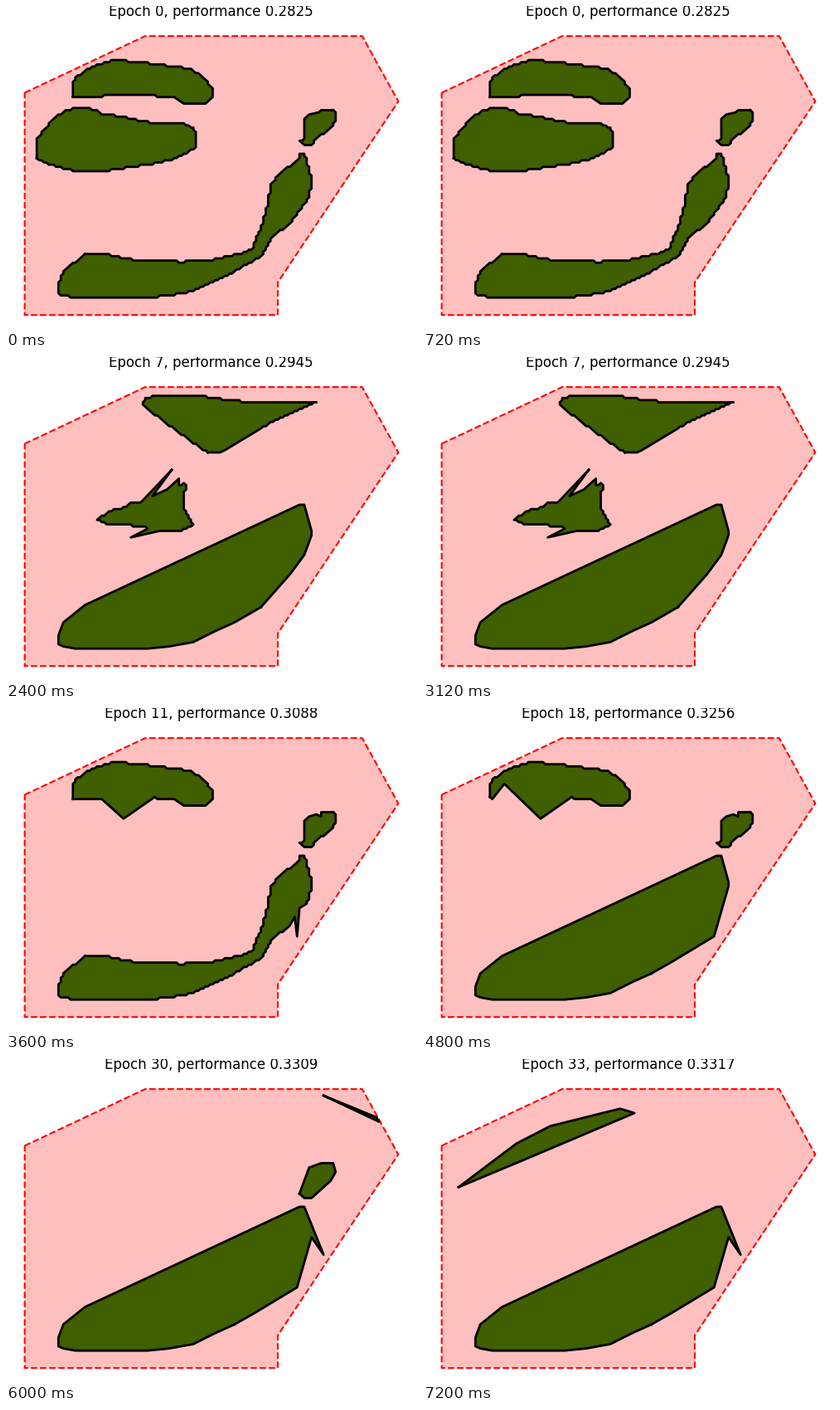
A matplotlib script for the animation above (8000 ms loop, 496 by 389 pixels).

```python
import matplotlib.pyplot as plt
import numpy as np
from matplotlib.animation import FuncAnimation

WIDTH, HEIGHT = 496, 389
COLS, ROWS = 155, 128  # the region's extent in grid cells
MARGIN = 0.05
AXES_HEIGHT = 369.6
INTERVAL = 400
FRAMES = 20
HOLD = 3  # animation frames per scene


def stairs(*keys):
    """Walk from key to key along grid cells, one cell at a time."""
    path = [keys[0]]
    for a, b in zip(keys, keys[1:]):
        count = max(abs(b[0] - a[0]), abs(b[1] - a[1]))
        walk = np.linspace(a, b, count + 1)[1:]
        path += [tuple(p) for p in np.floor(walk + 0.5)]
    return path


# Every point below is a (column, row) grid cell.
region = [(0, 26), (50, 0), (140, 0), (155, 30), (105, 113), (105, 128),
          (0, 128)]

# Upper-left cap: shared crest, varying underside
crest = stairs((20, 28), (20, 22), (21, 19), (28, 14), (37, 11), (42, 11),
               (43, 12), (48, 12), (69, 15), (73, 18), (78, 24), (78, 28))
base = stairs((62, 28), (56, 28), (54, 27), (33, 27), (32, 28))
ledge = [(75, 31), (66, 31)]
notch = ledge + [(62, 28), (55, 28), (54, 27), (41, 37)]
cap_full = crest + ledge + base
cap_cut = crest + [(73, 25), (66, 31)] + base
cap_wedge = crest + notch + [(32, 28)]
cap_bitten = crest[1:] + notch + [(26, 21), (21, 28)]

lens = stairs((5, 56), (5, 47), (12, 38), (17, 34), (21, 33), (26, 33),
              (30, 34), (32, 36), (35, 36), (54, 40), (65, 40), (70, 42),
              (71, 45), (71, 51), (63, 56), (51, 59), (32, 62), (21, 62),
              (14, 60), (8, 58), (5, 56))

# Small blob on the right
blob_side = stairs((128, 34), (129, 36), (129, 38), (127, 42), (120, 48),
                   (119, 50), (116, 50), (114, 48), (116, 47), (116, 38),
                   (118, 36))
blob = blob_side + stairs((122, 35), (123, 34))
blob_nicked = blob_side + [(121, 35), (123, 36), (123, 34)]
blob_hull = [(114, 48), (118, 36), (123, 34), (128, 34), (129, 38),
             (127, 42), (119, 50), (116, 50)]

# Curved arm and the hulls sharing its lower edge
bottom = [(98, 101), (87, 108), (79, 112), (70, 117), (60, 119), (51, 120),
          (21, 120), (16, 119), (14, 118), (14, 114), (16, 108), (25, 100)]
inner = [(25, 100), (33, 100), (47, 103), (63, 103), (64, 104), (66, 104),
         (67, 103), (77, 103), (92, 99), (95, 97), (96, 92), (98, 89),
         (101, 76), (102, 68), (105, 64), (114, 56)]
top = [(114, 54), (116, 54)]
tip = [(119, 66), (119, 68)]
bend = [(116, 77), (110, 86)]
arm_start = stairs(*inner, *top, *tip, (117, 76))
arm_end = stairs((110, 86), (103, 92), *bottom)
arm = arm_start + stairs(*bend) + arm_end
arm_spiked = arm_start + [(114, 78), (113, 91), (112, 82)] + arm_end

hull = bottom + top + tip + bend
far_corner = [(113, 91), (95, 103)]
hull_wide = bottom[1:] + top + tip + far_corner
hull_horn = bottom[1:] + top + [(124, 76), (119, 68)] + far_corner

wedge = stairs((76, 30), (68, 24), (52, 11), (49, 8), (50, 5), (54, 4),
               (75, 4), (76, 5), (81, 5), (82, 6), (89, 6), (90, 7),
               (121, 7), (104, 15), (98, 19)) + [(83, 29), (81, 30)]
scrap = ([(61, 38), (53, 50), (59, 47)]
         + stairs((64, 42), (64, 45), (66, 44), (67, 46), (66, 48), (66, 55),
                  (68, 60), (70, 63), (65, 66), (56, 66))
         + [(44, 69)]
         + stairs((51, 65), (50, 64), (45, 64), (44, 63), (35, 63), (30, 61),
                  (35, 57), (42, 55), (44, 53), (47, 53), (49, 52)))
sliver = [(124, 3), (146, 13), (147, 15)]
leaf = [(7, 45), (31, 25), (45, 17), (74, 9), (80, 11), (33, 33)]

SCENES = [
    (0, 0.2825, [cap_full, lens, blob, arm]),
    (3, 0.2895, [cap_cut, blob, arm]),
    (7, 0.2945, [wedge, scrap, hull]),
    (11, 0.3088, [cap_wedge, blob_nicked, arm_spiked]),
    (18, 0.3256, [cap_bitten, blob_nicked, hull_wide]),
    (30, 0.3309, [sliver, blob_hull, hull_horn]),
    (33, 0.3317, [leaf, hull_horn]),
]

fig = plt.figure(figsize=(WIDTH / 100, HEIGHT / 100), dpi=100,
                 facecolor="white")
ax = fig.add_axes([0, 0, 1, AXES_HEIGHT / HEIGHT])
ax.set_xlim(-MARGIN * COLS, (1 + MARGIN) * COLS)
ax.set_ylim((1 + MARGIN) * ROWS, -MARGIN * ROWS)
ax.axis("off")


def outline(points, **style):
    xs, ys = zip(*points, points[0])
    return ax.plot(xs, ys, **style)[0]


def fill(points, **style):
    return ax.fill(*zip(*points), linewidth=0, **style)[0]


def build(epoch, score, shapes):
    artists = [fig.text(247.4 / WIDTH, 1 - 12 / HEIGHT,
                        f"Epoch {epoch}, performance {score:.4f}",
                        ha="center", va="baseline", fontsize=12,
                        family="DejaVu Sans")]
    for shape in shapes:
        artists.append(fill(shape, color="green", zorder=1))
        artists.append(outline(shape, color="black", linewidth=2, zorder=4))
    return artists


fill(region, color="red", alpha=0.25, zorder=2)
outline(region, color="red", linestyle="--", linewidth=1.5, zorder=3)
scenes = [build(*scene) for scene in SCENES]


def update(frame):
    current = min(frame // HOLD, len(scenes) - 1)
    for i, artists in enumerate(scenes):
        for artist in artists:
            artist.set_visible(i == current)


anim = FuncAnimation(fig, update, frames=FRAMES, interval=INTERVAL,
                     repeat=True, repeat_delay=0, blit=False)
plt.show()
```
